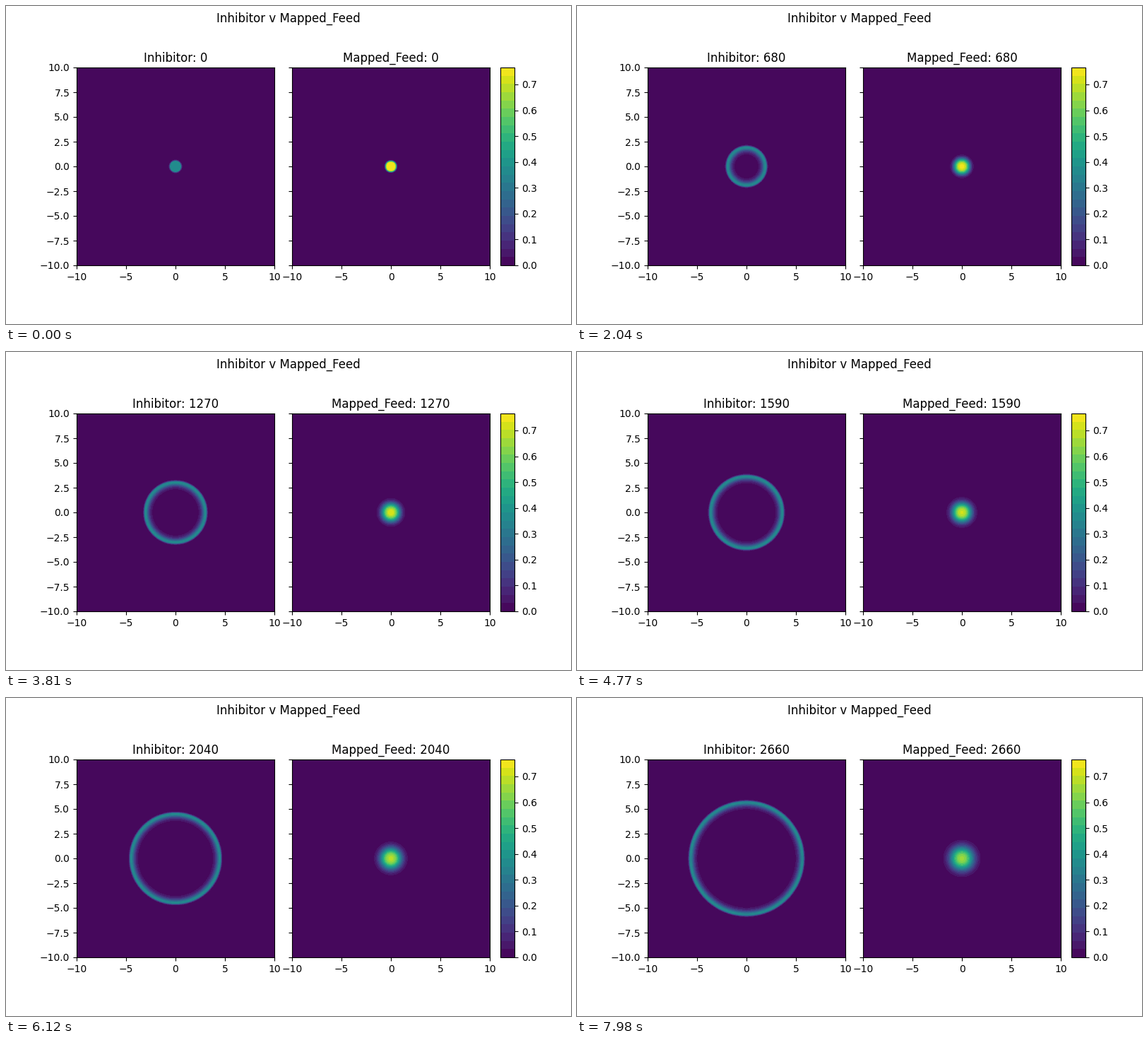
Recreate the animation shown at these times as a matplotlib script. Size 800 px wide and 450 px high, loop 8 s.

```python
import numpy as np
import matplotlib.pyplot as plt
from matplotlib.animation import FuncAnimation

W, H, DPI = 800, 450, 100
FRAMES, LOOP_MS, STEP = 267, 8000, 10
PX_PER_UNIT = 14
TOP = 0.7656
LEVELS = np.linspace(0, TOP, 25)

axis = np.linspace(-10, 10, 201)
X, Y = np.meshgrid(axis, axis)
R = np.hypot(X, Y) * PX_PER_UNIT  # radius in pixels


def inhibitor(n):
    """Ring-shaped pulse: sharp outer front, soft tail towards the centre."""
    edge = 10.2 + 0.0265 * n - 3.0 * np.exp(-n / 80)
    front = 1 / (1 + np.exp(np.clip((R - edge) / 0.6, -50, 50)))
    depth = np.maximum(edge - R, 0)
    peak = 0.45 + 0.2 * np.exp(-n / 60)
    length = 5.5 - 3.5 * np.exp(-n / 60)
    tail = peak * np.exp(-(depth / length) ** 1.5)
    core = 0.38 * np.exp(-n / 90)
    return front * np.maximum(tail, core)


def mapped_feed(n):
    """Flat-topped spot that spreads and slowly fades."""
    peak = 0.765 - 0.12 * (n / 2660) ** 1.35
    power = 2.4 + 1.2 * np.exp(-n / 900) + 7 * np.exp(-n / 100)
    reach = 8.5 + 0.153 * n ** 0.6
    width = reach / np.log(peak / LEVELS[1]) ** (1 / power)
    return peak * np.exp(-(R / width) ** power)


def add_axes(left, width):
    return fig.add_axes([left / W, 83 / H, width / W, 280 / H])


fig = plt.figure(figsize=(W / DPI, H / DPI), dpi=DPI)
fig.suptitle("Inhibitor v Mapped_Feed")
panels = [
    (add_axes(100, 280), "Inhibitor", inhibitor),
    (add_axes(405, 280), "Mapped_Feed", mapped_feed),
]
for ax, _, _ in panels:
    ax.set(xlim=(-10, 10), ylim=(-10, 10),
           xticks=np.arange(-10, 11, 5), yticks=np.arange(-10, 10.1, 2.5))
panels[1][0].tick_params(labelleft=False)

shown = []


def draw(i):
    n = i * STEP
    while shown:
        shown.pop().remove()
    for ax, name, field in panels:
        shown.append(ax.contourf(X, Y, field(n), levels=LEVELS, cmap="viridis"))
        ax.set_title(f"{name}: {n}")
    return shown


draw(0)
fig.colorbar(shown[1], cax=add_axes(700, 20), ticks=np.arange(0, 0.75, 0.1))

anim = FuncAnimation(fig, draw, frames=FRAMES, interval=LOOP_MS / FRAMES,
                     init_func=lambda: draw(0), repeat=True, repeat_delay=0)
plt.show()
```
